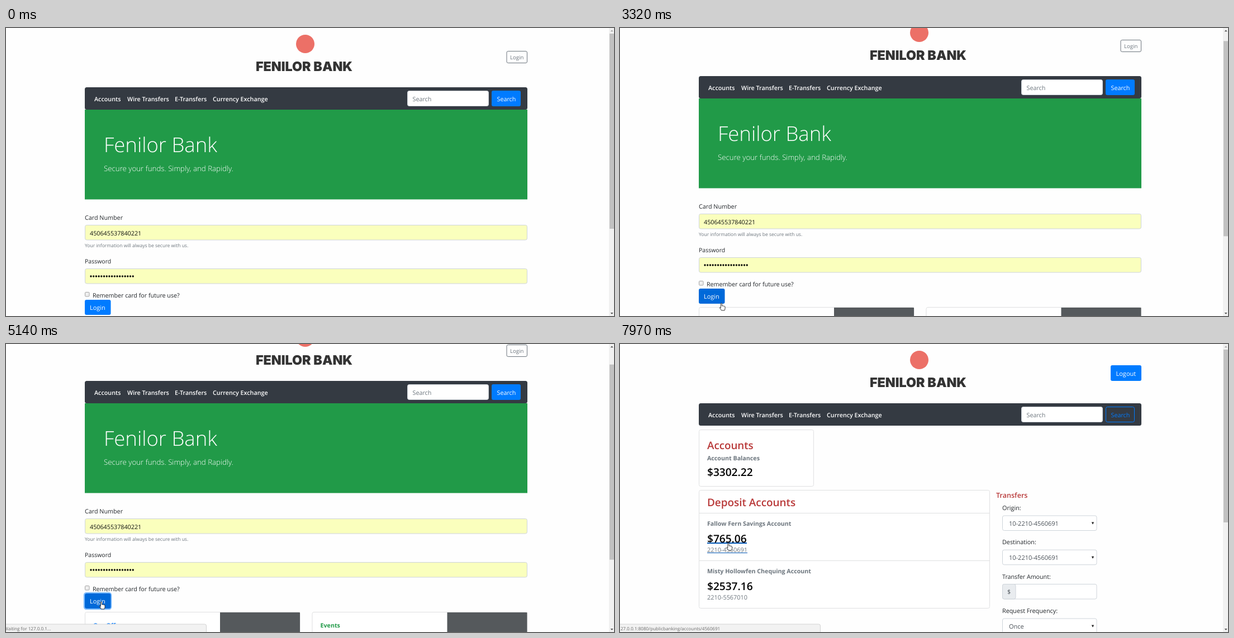
These frames come from a looping animation (1088x515 px, 8 s). An HTML page:

```html
<!DOCTYPE html>
<html lang="en">
<head>
<meta charset="utf-8">
<title>Online banking</title>
<style>
  html, body { margin: 0; width: 100%; height: 100%; overflow: hidden; background: #fefefe; }
  svg { display: block; width: 100vw; height: 100vh; }
  text { font-family: "Open Sans", "Noto Sans", sans-serif; text-rendering: geometricPrecision; white-space: pre; }
  .brand { font-family: Inter, sans-serif; font-weight: 900; text-anchor: middle; }
</style>
</head>
<body>
<svg id="stage" viewBox="0 0 1088 515" preserveAspectRatio="none"></svg>
<script>
const LOOP = 8000;
const INK = '#212529', GREY = '#6c757d', BLUE = '#007bff', GREEN = '#219a48',
      RED = '#b93a3a', DARK = '#343a42', LINE = '#ced4da', CARD = '#dfe0e1', HOVER = '#0056b3';

// ---- markup helpers ----
const text = (x, y, s, size = 10.75, fill = INK, weight = 400) =>
  `<text x="${x}" y="${y}" font-size="${size}" fill="${fill}" font-weight="${weight}">${s}</text>`;
const rect = (x, y, w, h, fill, extra = '') =>
  `<rect x="${x}" y="${y}" width="${w}" height="${h}" fill="${fill}" ${extra}/>`;
const box = (x, y, w, h, fill, stroke, r = 3) =>
  rect(x + .5, y + .5, w - 1, h - 1, fill, `rx="${r}" stroke="${stroke}"`);
const rule = (x1, x2, y, stroke, width = 1) =>
  `<path d="M${x1} ${y}H${x2}" stroke="${stroke}" stroke-width="${width}"/>`;
const group = (id, body, extra = '') => `<g id="${id}" ${extra}>${body}</g>`;

const header = () =>
  '<circle cx="535.5" cy="28.5" r="16.5" fill="#ec7067"/>' +
  '<text class="brand" x="533.5" y="77" font-size="23.3" fill="#333">FENILOR BANK</text>' +
  rect(141, 106, 792, 40, DARK, 'rx="3.5"') +
  [[158, 'Accounts'], [217, 'Wire Transfers'], [302, 'E-Transfers'], [370, 'Currency Exchange']]
    .map(([x, s]) => text(x, 131, s, 10.75, '#fff', 600)).join('') +
  box(718, 112, 146, 28, '#fff', LINE) + text(727.5, 131, 'Search', 10.75, GREY);

const offer = (x, title, color) =>
  box(x, 519, 385.5, 160, '#fff', CARD) + rect(x + 242, 520, 143, 158, '#55595c') +
  text(x + 15, 547, title, 10.7, color, 700);

const dots = Array.from({ length: 17 }, (_, i) =>
  `<circle cx="${152 + i * 4.7}" cy="444" r="1.65"/>`).join('');

const loginPage = () => header() +
  box(895.5, 41, 37.5, 22, 'none', GREY, 2.5) + text(902, 56, 'Login', 9.6, GREY) +
  rect(869, 112, 52, 28, BLUE, 'rx="3"') + text(878.5, 131, 'Search', 10.75, '#fff') +
  rect(141, 146, 792, 160.5, GREEN) +
  text(175, 221.5, 'Fenilor Bank', 36.5, '#fff', 300) +
  text(175, 256, 'Secure your funds. Simply, and Rapidly.', 13.3, '#fff', 300) +
  text(141, 343, 'Card Number') +
  box(141, 352, 792, 27.5, '#faffbd', LINE) + text(150, 370.5, '450645537840221', 10.75, '#111') +
  text(141, 392.3, 'Your information will always be secure with us.', 8.53, GREY) +
  text(141, 420.5, 'Password', 10.5) +
  box(141, 430, 792, 27.5, '#faffbd', LINE) + dots +
  box(141, 472, 8.5, 8.5, '#eee', '#a2a2a2', 1.2) +
  text(155, 482, 'Remember card for future use?', 10.7) +
  rect(139.9, 484.9, 48.2, 29.2, 'none', 'id="ring" rx="4" stroke="#80bdff" stroke-width="2.3"') +
  rect(141, 486, 46.5, 27, BLUE, 'id="login" rx="3"') + text(150, 504, 'Login', 10.9, '#fff') +
  offer(141, 'Our Offers', BLUE) + offer(547.5, 'Events', GREEN);

const select = (y, label, value) =>
  text(684, y - 9.7, label, 10.8) + box(684, y, 169.5, 27.5, '#fff', LINE) +
  text(696, y + 18.3, value, 11, '#495057') +
  `<path d="M843.8 ${y + 12}h4.4l-2.2 4.2z" fill="#222"/>`;

const account = (id, y, name, sum, number, end) =>
  text(156, y, name, 10.7, GREY, 700) +
  text(156, y + 30, sum, 19.1, '#000', 600) + text(156, y + 47, number, 10.9, GREY) +
  group(id, rule(156, end, y + 31, HOVER, 2) + rule(156, 228, y + 48.5, HOVER));

const accountsPage = () => header() +
  rect(878, 38, 55, 28, BLUE, 'rx="3"') + text(887.5, 56.7, 'Logout', 11, '#fff') +
  box(869, 112, 52, 28, 'none', BLUE) + text(878.5, 131, 'Search', 10.75, BLUE) +
  box(141, 153, 206, 102, '#fff', CARD) +
  text(156, 188, 'Accounts', 18.75, RED, 600) +
  text(156, 207.7, 'Account Balances', 10.7, GREY, 700) +
  text(156, 236, '$3302.22', 19.1, '#000', 600) +
  box(141, 261, 521, 212, '#fff', CARD) +
  text(156, 290, 'Deposit Accounts', 18.9, RED, 600) +
  rule(141, 662, 302.5, CARD) + rule(141, 662, 387.5, CARD) +
  account('savings', 325, 'Fallow Fern Savings Account', '$765.06', '2210-4560691', 227) +
  account('chequing', 409.5, 'Misty Hollowfen Chequing Account', '$2537.16', '2210-5567010', 235) +
  text(673, 275, 'Transfers', 12.6, RED, 600) +
  select(306.5, 'Origin:', '10-2210-4560691') +
  select(367.7, 'Destination:', '10-2210-4560691') +
  text(684, 419.5, 'Transfer Amount:', 10.7) +
  box(684, 429, 169.5, 27.5, '#fff', LINE) + box(684, 429, 24.5, 27.5, '#e9ecef', LINE) +
  text(693, 447, '$', 10.75, '#495057') +
  select(490.5, 'Request Frequency:', 'Once');

const stage = document.getElementById('stage');
stage.innerHTML =
  rect(0, 0, 1088, 515, '#fefefe') +
  group('home', loginPage()) + group('accounts', accountsPage()) +
  rect(1079, 0, 9, 515, '#f1f1f1') + rect(1080, 10, 8, 349, '#c1c1c1', 'id="thumb"') +
  '<path id="up" d="M1081.7 6.2h5l-2.5-2.8z"/><path d="M1081.7 509h5l-2.5 2.8z" fill="#505050"/>' +
  group('status', box(-6, 500.5, 365, 20, '#f2f2f2', '#d3d3d3') +
    '<text id="note" x="-3.7" y="512.3" font-size="8.1" fill="#6a6a6a"></text>') +
  group('cursor',
    '<path id="arrow" d="M0 0V10l2.4-2.2 1.6 3.6 1.7-.7-1.6-3.5h3.2z"/>' +
    '<path id="hand" d="M-1.2 8V1.1a1.1 1.1 0 0 1 2.2 0V5q1-.6 2 .2 1-.5 1.9.3 1.6-.2 1.6 1.3V9.5q0 1.5-1 3.5H0q-1-2-3.2-4.6-.2-1.4 2 .1z"/>',
    'fill="#fff" stroke="#222" stroke-width=".9" stroke-linejoin="round"');

const el = {};
stage.querySelectorAll('[id]').forEach(n => el[n.id] = n);
const show = (node, on) => node.setAttribute('visibility', on ? 'visible' : 'hidden');

// ---- motion: [start, end, steps, ...points] ----
const MOVES = [
  [710, 860, 4, [765, 510], [681, 512]],
  [1160, 1260, 3, [620, 508], [506, 501]],
  [1560, 1710, 4, [434.5, 491], [315, 483]],
  [1960, 2160, 5, [278, 482], [143, 479]],
  [2410, 3010, 13, [146, 482], [185, 496], [221, 500], [200, 497], [181.5, 492]],
  [3670, 4460, 16, [181.5, 492], [177, 480], [174, 464]],
  [4510, 4710, 5, [173, 461], [165, 453], [170.5, 461]],
  [6730, 7520, 17, [170.5, 460.5], [176, 440], [186, 398], [192, 362]],
  [7570, 7770, 5, [191.5, 362], [190, 357], [194, 356]]
];

function pointer(t) {
  const move = MOVES.filter(m => t >= m[0]).pop();
  if (!move) return null;
  const [start, end, steps, ...pts] = move;
  const last = steps - 1;
  const k = Math.min(last, Math.floor((t - start) / (end - start) * last + 1e-6));
  const at = k / last * (pts.length - 1);
  const i = Math.min(pts.length - 2, Math.floor(at));
  return [0, 1].map(a => pts[i][a] + (pts[i + 1][a] - pts[i][a]) * (at - i));
}

// Last value in a table of [time, value] whose time has come.
const held = (table, t) => table.reduce((v, [at, next]) => t >= at ? next : v, 0);
const SCROLL = [[3320, 20], [3370, 39], [3670, 40]];
const RING = [[4880, .5], [4940, 1]];
const STATUS = [[5140, 1], [6130, .75], [6180, .5], [6230, .25], [6290, 0], [7920, .5], [7970, 1]];

const inside = (p, x, y, w, h) =>
  !!p && p[0] >= x && p[0] <= x + w && p[1] >= y && p[1] <= y + h;

function render(t) {
  const home = t < 5610, p = pointer(t);
  const scroll = home ? held(SCROLL, t) : 0;
  // Hover state lags behind scrolling and page loads until the pointer moves.
  const overLogin = home && inside(p, 141, 486 - (t < 3420 ? 0 : scroll), 46.5, 27);
  const overSavings = !home && inside(p, 156, 336, 72, 38);
  const overChequing = !home && t >= 6780 && inside(p, 156, 421, 79, 38);
  const stale = !home && t < 6780;

  show(el.home, home);
  show(el.accounts, !home);
  show(el.savings, overSavings);
  show(el.chequing, overChequing);
  el.home.setAttribute('transform', `translate(0 ${-scroll})`);
  el.login.setAttribute('fill', overLogin ? '#0069d9' : BLUE);
  el.ring.setAttribute('opacity', held(RING, t));

  el.thumb.setAttribute('y', 10 + scroll * 2 / 3);
  el.thumb.setAttribute('height', home ? 349 : 309);
  el.up.setAttribute('fill', scroll ? '#505050' : '#a3a3a3');

  el.status.setAttribute('opacity', held(STATUS, t));
  el.note.textContent = t < 7000 ? 'Waiting for 127.0.0.1...' : '127.0.0.1:8080/publicbanking/accounts/4560691';

  const hand = overLogin || overSavings || overChequing || stale;
  show(el.arrow, p && !hand);
  show(el.hand, p && hand);
  if (p) el.cursor.setAttribute('transform', `translate(${p[0]} ${p[1]})`);
}

function frame() {
  render(performance.now() % LOOP);
  requestAnimationFrame(frame);
}
frame();
</script>
</body>
</html>
```
